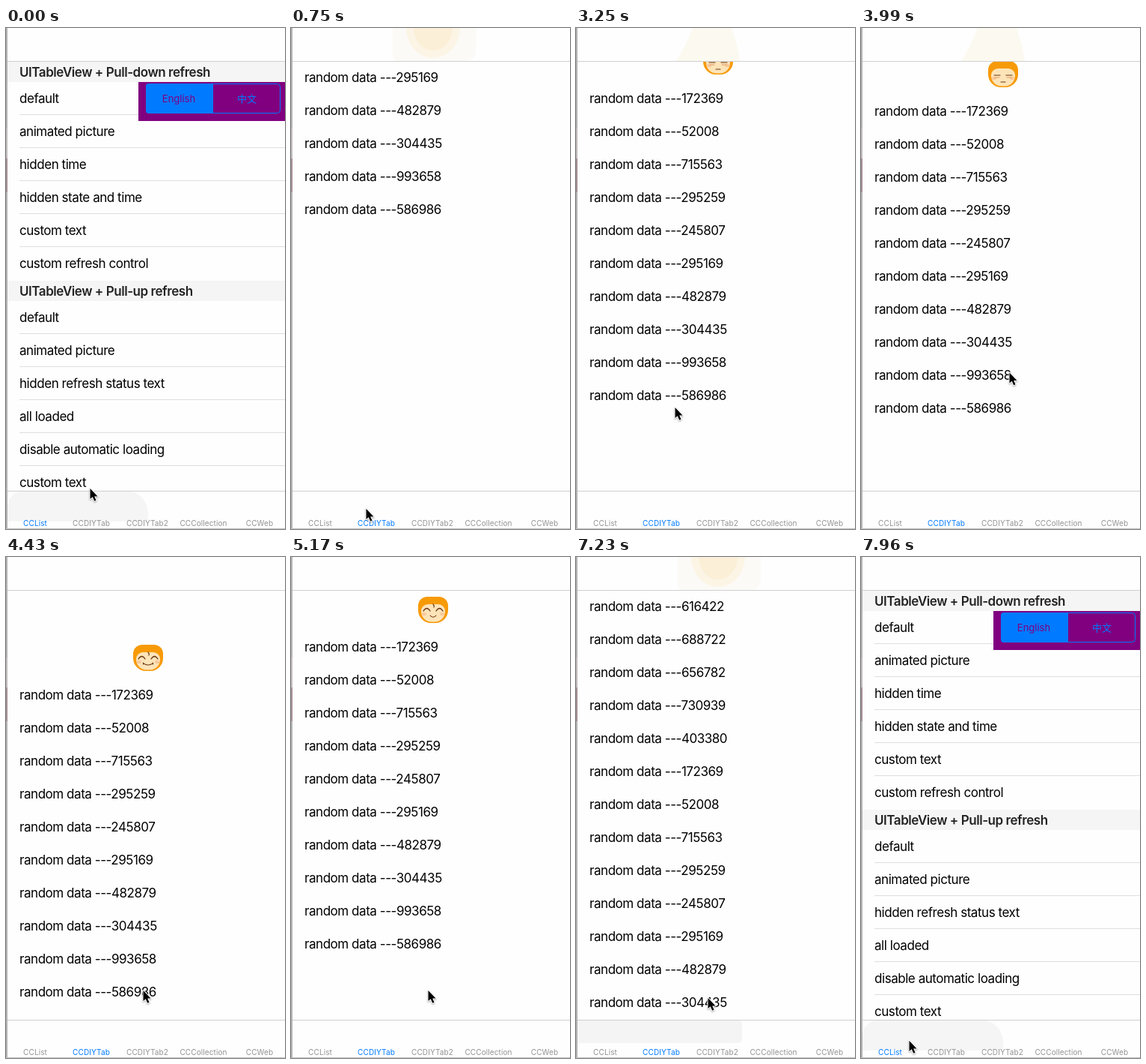
An HTML page with a canvas that plays this animation: 373 by 668 pixels, repeating every 8000 ms.

```html
<!DOCTYPE html>
<html lang="en">
<head>
<meta charset="utf-8">
<title>Pull to refresh</title>
<style>
  html, body { margin: 0; width: 100%; height: 100%; overflow: hidden; background: #fefefe; }
  canvas { display: block; width: 373px; height: 668px; }
</style>
</head>
<body>
<canvas id="stage" width="373" height="668"></canvas>
<script>
const ctx = document.getElementById('stage').getContext('2d');
const W = 373, H = 668, NAV = 44, TAB = 617;
const LOOP = 8000, STEP = 147.4;
const FONT = 'Inter, "Noto Sans CJK SC", "Noto Sans CJK", sans-serif';
const BLUE = '#007aff', PURPLE = '#800080', PAPER = '#fefefe', BROWN = '#6b3413';

const tabs = ['CCList', 'CCDIYTab', 'CCDIYTab2', 'CCCollection', 'CCWeb'];
const sections = [
  [45, 'UITableView + Pull-down refresh',
    ['default', 'animated picture', 'hidden time', 'hidden state and time', 'custom text', 'custom refresh control']],
  [337, 'UITableView + Pull-up refresh',
    ['default', 'animated picture', 'hidden refresh status text', 'all loaded', 'disable automatic loading', 'custom text']]
];
const data = [616422, 688722, 656782, 730939, 403380, 172369, 52008, 715563,
  295259, 245807, 295169, 482879, 304435, 993658, 586986];

// Tracks: step number, then the values to interpolate.
const cursorTrack = [[0, 112, 613], [3, 99, 640], [5, 100, 640], [8, 120, 562], [10, 131, 512], [11, 132, 505],
  [22, 132, 505], [24, 190, 420], [26, 206, 380], [28, 190, 537], [30, 183, 577],
  [46, 183, 577], [49, 176, 587], [51, 90, 632], [52, 66, 641], [53, 64, 644]];
const pullTrack = [[5, 0], [6, 14], [7, 42], [8, 54], [20, 54], [21, 52], [22, 28], [23, 8], [24, 0],
  [26, 0], [27, 45], [28, 88], [29, 112], [30, 118], [31, 118], [32, 82], [33, 58], [34, 54],
  [44, 54], [45, 52], [46, 28], [47, 8], [48, 0]];

function sample(track, k) {
  const i = track.findIndex(key => key[0] > k);
  if (i < 0) return track[track.length - 1].slice(1);
  if (i === 0) return track[0].slice(1);
  const a = track[i - 1], b = track[i], p = (k - a[0]) / (b[0] - a[0]);
  return a.slice(1).map((v, j) => v + (b[j + 1] - v) * p);
}

function rect(x, y, w, h, color) {
  ctx.fillStyle = color;
  ctx.fillRect(x, y, w, h);
}

function round(x, y, w, h, radii, color) {
  ctx.fillStyle = color;
  ctx.beginPath();
  ctx.roundRect(x, y, w, h, radii);
  ctx.fill();
}

function ellipse(x, y, rx, ry, color) {
  ctx.fillStyle = color;
  ctx.beginPath();
  ctx.ellipse(x, y, rx, ry, 0, 0, Math.PI * 2);
  ctx.fill();
}

function stroke(path, color, width) {
  ctx.strokeStyle = color;
  ctx.lineWidth = width;
  ctx.stroke(new Path2D(path));
}

function text(value, x, baseline, { size = 17, weight = 400, color = '#000', spacing = 0, align = 'left' } = {}) {
  ctx.font = `${weight} ${size}px ${FONT}`;
  ctx.letterSpacing = spacing + 'px';
  ctx.textAlign = align;
  ctx.fillStyle = color;
  ctx.fillText(value, x, baseline);
}

const rowText = (value, center) => text(value, 18, center + 6, { spacing: -0.45 });

function drawMenu() {
  for (const [top, title, rows] of sections) {
    rect(2, top, W - 2, 27, '#f5f5f5');
    text(title, 18, top + 19.5, { weight: 600, color: '#222', spacing: -0.45 });
    rows.forEach((row, i) => {
      rowText(row, top + 49 + 44 * i);
      if (i < 5) rect(18, top + 70 + 44 * i, W - 18, 1, '#dedee0');
    });
  }
  rect(177, 72, 196, 52, PURPLE);
  round(187, 74, 90, 40, [4, 0, 0, 4], BLUE);
  ctx.strokeStyle = BLUE;
  ctx.lineWidth = 1;
  ctx.beginPath();
  ctx.roundRect(187.5, 74.5, 179, 39, 4);
  ctx.stroke();
  text('English', 231, 98.5, { size: 13, color: PURPLE, align: 'center' });
  text('中文', 322, 98.5, { size: 13, color: BLUE, align: 'center' });
}

function drawFace(y, smiling, pose) {
  ctx.save();
  ctx.translate(190, y);
  ctx.lineCap = 'round';
  round(-20, -17, 40, 35, [12, 12, 17, 17], '#f79a08');
  round(-16, -7, 32, 23.5, [9, 9, 14, 14], '#fde4b8');
  ellipse(-12, 6, 3, 2, '#f9c79a');
  ellipse(12, 6, 3, 2, '#f9c79a');
  if (smiling) {
    stroke('M-13 2Q-8.500 -5 -4 2M4 2Q8.500 -5 13 2', BROWN, 1.3);
    stroke(pose === 2 ? 'M-4 8Q0 12.500 4 8' : 'M-6 8Q0 12 6 8M-6.500 7V9M6.500 7V9', BROWN, 1.1);
    stroke(pose === 1 ? 'M-2 -8Q0 -5 1 -8' : 'M0 -7Q2 -5 1 -3', BROWN, 1.2);
    if (pose === 1) stroke('M-22 4Q-26 8 -23 13M22 4Q26 8 23 13', '#bbb', 1);
  } else {
    stroke('M-12 2H-4M4 2H12', BROWN, 1.2);
    stroke('M-11 5H-5M5 5H11', '#d99a62', 1);
    stroke('M-3 11H3', BROWN, 1.1);
  }
  ctx.restore();
}

// Soft tint of the face seen through the navigation bar.
function drawGlow(pull) {
  if (pull < 5) {
    round(136, 0, 111, NAV, [0, 0, 14, 8], '#fbfaf6');
    ellipse(190, 0, 36, 40, '#fcf5e6');
    ellipse(190, 0, 26, 30, '#fbefd7');
  } else if (pull < 48) {
    ctx.fillStyle = '#fcf9f0';
    ctx.fill(new Path2D('M156 0H208Q216 22 219 44H134Q146 26 156 0Z'));
  }
}

function drawData(k) {
  const [pull] = sample(pullTrack, k);
  const rows = data.slice(k < 21 ? 10 : k < 45 ? 5 : 0);
  drawFace(16 + pull, pull >= 54, k % 3);
  rows.forEach((n, i) => rowText('random data ---' + n, 66 + pull + 44 * i));
  return { pull, full: rows.length > 13 };
}

function drawBars(active, state) {
  rect(0, 0, W, NAV, PAPER);
  if (state) drawGlow(state.pull);
  rect(2, NAV, W - 2, 1, '#cfcfd1');
  rect(0, TAB, W, H - TAB, PAPER);
  if (!state) round(2, TAB, 188, 41, [22, 30, 4, 0], '#f5f5f5');
  else if (state.full) round(2, TAB, 220, 31, [0, 6, 6, 0], '#f4f4f4');
  rect(2, TAB, W - 2, 1, '#cfcfd1');
  tabs.forEach((name, i) => text(name, 39 + 75 * i, 663.5, {
    size: 10, color: i === active ? BLUE : '#929292', spacing: 0.1, align: 'center'
  }));
}

function drawEdges() {
  rect(0, 0, 2, H, '#b2b2b4');
  rect(0, 134, 2, 40, '#c0babb');
  rect(0, 174, 2, 45, '#a48f93');
  rect(0, H - 1, W, 1, '#c4c4c4');
}

function drawCursor([x, y]) {
  ctx.save();
  ctx.translate(x + 0.5, y + 1);
  const arrow = new Path2D('M0 0V14L3.200 11.200L5.700 16.800L8 15.800L5.700 10.400H10Z');
  ctx.lineJoin = 'round';
  ctx.shadowColor = 'rgba(0,0,0,.35)';
  ctx.shadowBlur = 2;
  ctx.shadowOffsetY = 1;
  ctx.strokeStyle = '#fff';
  ctx.lineWidth = 2;
  ctx.stroke(arrow);
  ctx.shadowColor = 'transparent';
  ctx.fillStyle = '#000';
  ctx.fill(arrow);
  ctx.restore();
}

function render() {
  const k = Math.floor((performance.now() % LOOP) / STEP);
  const onMenu = k < 5 || k >= 53;
  rect(0, 0, W, H, PAPER);
  const state = onMenu ? drawMenu() : drawData(k);
  drawBars(onMenu ? 0 : 1, state);
  drawEdges();
  drawCursor(sample(cursorTrack, k));
  requestAnimationFrame(render);
}
render();
</script>
</body>
</html>
```
